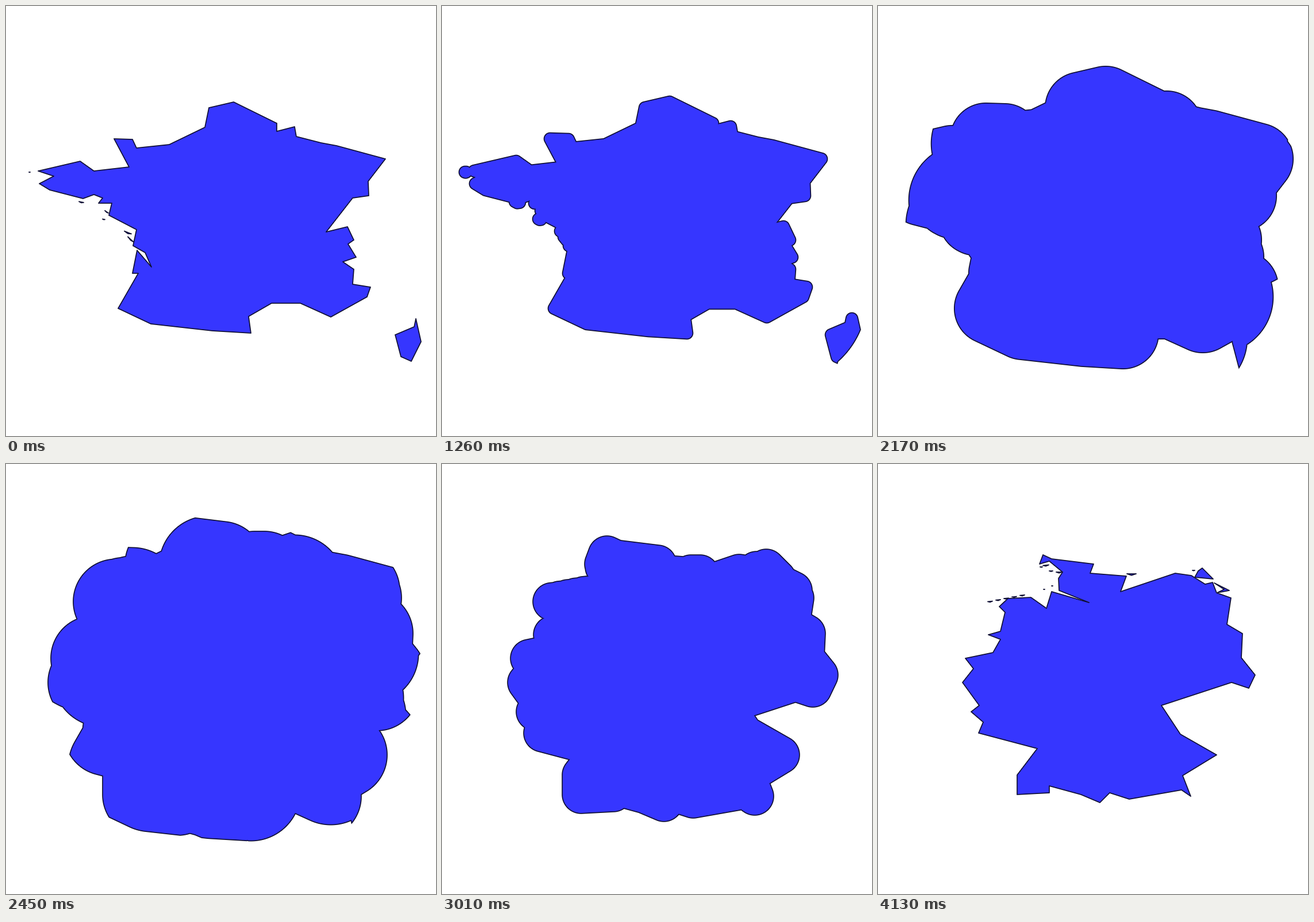
Recreate the animation shown at these times as a matplotlib script. Size 748x748 px, loop 4.83 s.

```python
import numpy as np
import matplotlib.pyplot as plt
from matplotlib.animation import FuncAnimation

SIZE, DPI = 748, 64
STEP_MS, HOLD, STEPS = 70, 9, 50
FRAMES = STEPS + 2 * HOLD + 1
WHITE = np.array([1, 1, 1], np.float32)
FILL = np.array([55, 55, 255], np.float32) / 255
LINE = np.array([14, 14, 50], np.float32) / 255
WIDTH = 1.7


def isle(x, y, half, slope=0.0):
    """Thin triangle centred on its long side."""
    rise = slope * half
    return [(x - half, y - rise), (x + half, y + rise), (x, y + half / 3)]


# Mainland corners, clockwise from the north
FRANCE = [
    (396, 167), (471, 204), (471, 218), (502, 210), (505, 227), (548, 238),
    (575, 243), (660, 266), (630, 305), (631, 330), (603, 334), (557, 393),
    (594, 384), (605, 407), (595, 414), (609, 437), (586, 445), (605, 458),
    (603, 484), (634, 489), (628, 506), (565, 541), (512, 517), (462, 517),
    (422, 540), (426, 569), (359, 565), (252, 553), (195, 526), (230, 465),
    (220, 465), (228, 425), (253, 454), (242, 429), (221, 417), (227, 389),
    (179, 364), (184, 343), (161, 343), (168, 334), (153, 328), (134, 335),
    (76, 320), (58, 309), (83, 296), (56, 287), (129, 270), (153, 287),
    (214, 280), (188, 231), (220, 232), (227, 247), (284, 241), (346, 211),
    (353, 177),
]
CORSICA = [(713, 544), (722, 584), (705, 618), (687, 610), (677, 572),
           (710, 558)]
GERMANY = [
    (287, 158), (302, 165), (375, 174), (369, 190), (432, 195), (422, 222),
    (517, 190), (545, 194), (569, 209), (582, 206), (589, 224), (614, 233),
    (607, 279), (634, 295), (632, 337), (656, 367), (645, 390), (615, 380),
    (493, 420), (526, 470), (589, 506), (530, 542), (544, 578), (528, 567),
    (437, 583), (403, 572), (386, 589), (353, 575), (298, 560), (298, 572),
    (242, 575), (242, 541), (277, 495), (175, 468), (183, 449), (162, 431),
    (176, 420), (147, 380), (166, 356), (152, 338), (200, 328), (213, 305),
    (192, 297), (213, 291), (221, 258), (211, 248), (226, 234), (266, 232),
    (293, 251), (302, 222), (367, 241), (315, 220), (314, 199), (321, 188),
    (298, 169), (281, 174),
]
RUEGEN = [(564, 181), (583, 200), (551, 197), (557, 186)]
USEDOM = [(585, 207), (611, 220), (590, 224), (602, 218)]

atlantic = [isle(41, 289, 1), isle(131, 341, 4, 0.2), isle(175, 358, 3, 0.7),
            isle(170, 371, 2, 0.2), isle(212, 394, 6, 0.4),
            isle(217, 406, 5, 0.9)]
frisian = [isle(195 + 14 * i, 239 - 2.7 * i, 4, -0.1) for i in range(5)]
north_sea = [isle(284, 179, 2), isle(292, 176, 5, -0.1), isle(301, 186, 3),
             isle(315, 188, 5), isle(289, 218, 1), isle(303, 212, 1)]
baltic = [isle(441, 191, 8), isle(549, 185, 2)]


def signed_distance(rings):
    """Distance to the nearest outline, negative inside."""
    x = np.arange(SIZE, dtype=np.float32)[None, :] + np.float32(0.5)
    y = x.T
    best = np.full((SIZE, SIZE), np.inf, np.float32)
    inside = np.zeros((SIZE, SIZE), bool)
    for ring in rings:
        for (x0, y0), (x1, y1) in zip(ring, ring[1:] + ring[:1]):
            dx, dy = x1 - x0, y1 - y0
            t = ((x - x0) * dx + (y - y0) * dy) / np.float32(dx * dx + dy * dy)
            np.clip(t, 0, 1, out=t)
            np.minimum(best, (x - x0 - t * dx) ** 2 + (y - y0 - t * dy) ** 2,
                       out=best)
            if dy:
                rows = ((y > y0) != (y > y1)).ravel()
                inside[rows] ^= x < x0 + (y[rows] - y0) * dx / dy
    dist = np.sqrt(best)
    return np.where(inside, -dist, dist)


def ease(t):
    return 2 * t * t if t < 0.5 else 1 - 2 * (1 - t) ** 2


def paint(field):
    inside = np.clip(0.5 - field, 0, 1)[..., None]
    edge = np.clip(WIDTH / 2 + 0.5 - np.abs(field), 0, 1)[..., None]
    rgb = WHITE + (FILL - WHITE) * inside
    return rgb + (LINE - rgb) * edge


start = signed_distance([FRANCE, CORSICA] + atlantic)
end = signed_distance([GERMANY, RUEGEN, USEDOM] + frisian + north_sea + baltic)
# Hausdorff distance between the two shapes
reach = float(max(end[start <= 0].max(), start[end <= 0].max()))


def shape(frame):
    """Overlap of the growing start and the shrinking end."""
    step = min(max(frame - HOLD, 0), STEPS)
    if step == 0:
        return start
    if step == STEPS:
        return end
    grow = reach * ease(step / STEPS)
    return np.maximum(start - grow, end - (reach - grow))


fig = plt.figure(figsize=(SIZE / DPI, SIZE / DPI), dpi=DPI, facecolor="white")
ax = fig.add_axes([0, 0, 1, 1])
ax.axis("off")
picture = ax.imshow(paint(start), interpolation="nearest", aspect="auto")


def update(frame):
    picture.set_data(paint(shape(frame)))
    return [picture]


anim = FuncAnimation(fig, update, frames=FRAMES, interval=STEP_MS,
                     repeat=True, repeat_delay=0)
plt.show()
```
